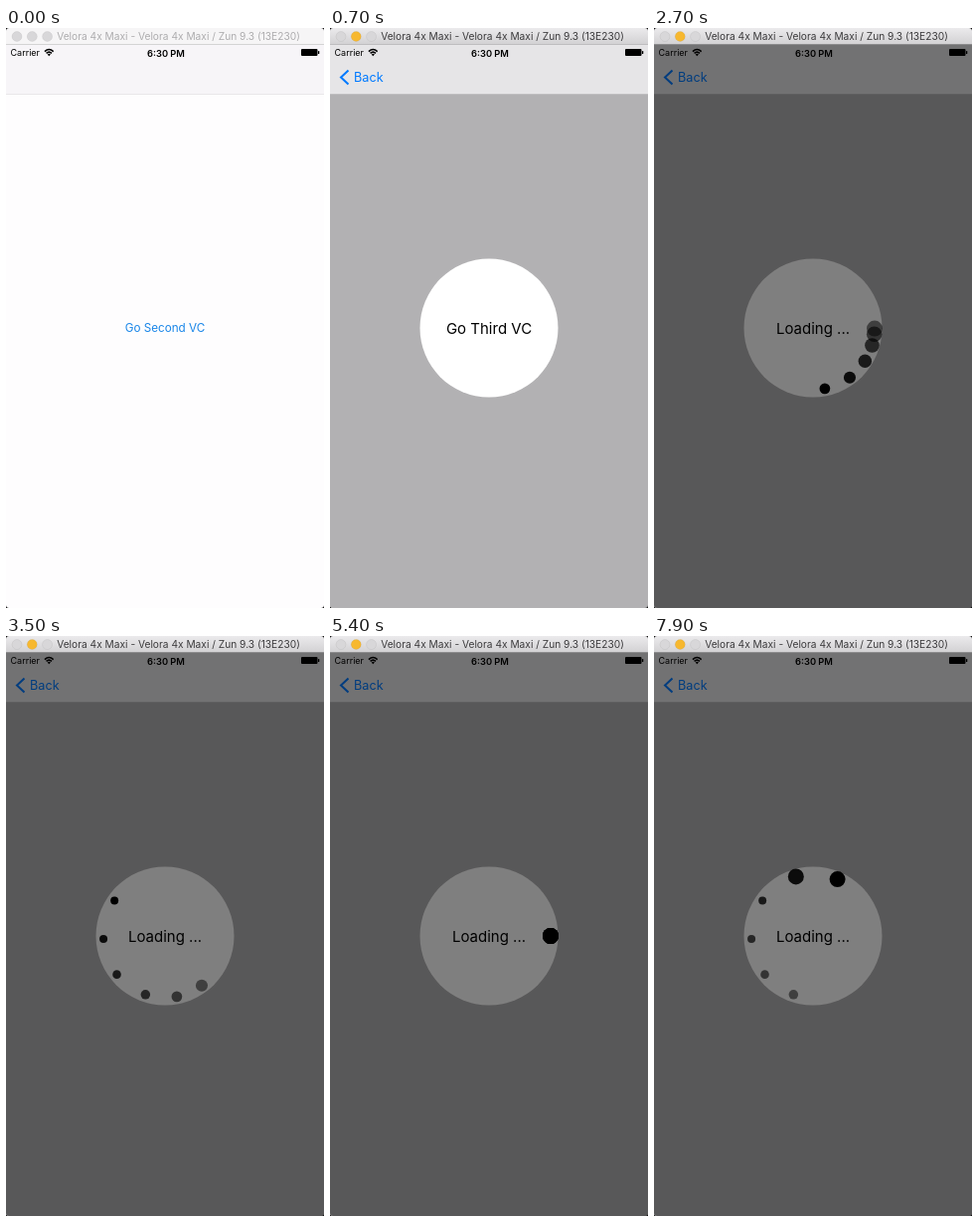
An HTML page for the animation above (8 s loop, 320x582 px).

```html
<!DOCTYPE html>
<html lang="en">
<head>
<meta charset="utf-8">
<style>
html, body { margin: 0; width: 100%; height: 100%; overflow: hidden; background: #000; }
svg { display: block; width: 320px; height: 582px; font-family: Inter, Roboto, sans-serif; }
.mid { text-anchor: middle; }
</style>
</head>
<body>
<svg viewBox="0 0 320 582">
  <defs>
    <linearGradient id="chrome" x2="0" y2="1">
      <stop stop-color="#ebeaec"/><stop offset="1" stop-color="#d2d1d3"/>
    </linearGradient>
    <clipPath id="window"><rect width="320" height="582" rx="3"/></clipPath>
  </defs>
  <g clip-path="url(#window)">
    <g id="first">
      <rect y="16" width="320" height="566" fill="#fefdfe"/>
      <text class="mid" x="160" y="305" font-size="11.7" fill="#1a86e8">Go Second VC</text>
    </g>
    <g id="second">
      <rect y="16" width="320" height="566" fill="#b2b1b3"/>
      <circle cx="160" cy="301" r="69.5" fill="#fff"/>
      <text id="go" class="mid" x="160" y="306.5" font-size="15">Go Third VC</text>
    </g>
    <rect y="16" width="320" height="50.5" fill="#f5f4f6" fill-opacity=".78"/>
    <rect y="66" width="320" height=".6" fill-opacity=".12"/>
    <g id="back" fill="#007aff">
      <path d="M18.5 42.5 L11 49.5 L18.5 56.5" fill="none" stroke="#007aff" stroke-width="2"/>
      <text id="label" x="24" y="54" font-size="12.7">Back</text>
    </g>
    <text x="4.5" y="28.3" font-size="9">Carrier</text>
    <g fill="none" stroke="#000" stroke-width="1.5">
      <path d="M38.9 23.6 Q43.3 19.4 47.7 23.6"/>
      <path d="M40.6 25.4 Q43.3 22.8 46 25.4"/>
    </g>
    <path d="M41.7 26.5 Q43.3 25.2 44.9 26.5 L43.3 28.2 Z"/>
    <text class="mid" x="161" y="28.5" font-size="9.3" font-weight="600">6:30 PM</text>
    <rect x="297" y="21" width="16.5" height="7" rx="1"/>
    <rect x="314" y="23" width="1.3" height="3" rx=".6"/>
    <rect id="shade" y="16" width="320" height="566"/>
    <g id="loader">
      <g id="dots"></g>
      <text id="loading" class="mid" x="160" y="306.5" font-size="15">Loading ...</text>
    </g>
    <rect id="bar" width="320" height="16.5"/>
    <rect y="16" width="320" height=".7" fill-opacity=".2"/>
    <g id="lights" stroke="#000" stroke-opacity=".06" fill="#d8d7d9">
      <circle cx="11" cy="8.5" r="5"/>
      <circle id="amber" cx="26.3" cy="8.5" r="5"/>
      <circle cx="41.6" cy="8.5" r="5"/>
    </g>
    <text id="title" class="mid" x="173.5" y="12.4" font-size="10.2">Velora 4x Maxi - Velora 4x Maxi / Zun 9.3 (13E230)</text>
  </g>
</svg>
<script>
const LOOP = 8000, LAP = 4000, START = 1616, DELAY = 200, COUNT = 6;
const $ = id => document.getElementById(id);
const set = (el, attrs) => Object.entries(attrs).forEach(([k, v]) => el.setAttribute(k, v));
const ramp = (t, from, to) => Math.min(1, Math.max(0, (t - from) / (to - from)));

const dots = Array.from({ length: COUNT }, (_, i) => {
  const dot = document.createElementNS('http://www.w3.org/2000/svg', 'circle');
  set(dot, { opacity: 1 - i * 0.1 });
  return $('dots').appendChild(dot);
});

// Steps are counted in units of the delay between two dots.
function placeDot(dot, elapsed) {
  const n = elapsed < 0 ? 0 : (elapsed % LAP) / DELAY;
  const degrees = Math.min(360, 276.6 * (1 - Math.cos(Math.PI * n / 22)));
  const a = n > 13.2 ? 0 : degrees * Math.PI / 180;
  const shrink = n < 10 ? (1 - Math.cos(Math.PI * Math.min(1, n / 9))) / 2 : 0;
  set(dot, { cx: 160 + 62 * Math.cos(a), cy: 301 + 62 * Math.sin(a), r: 8 - 4 * shrink });
}

function draw(t) {
  const active = t >= 100;
  set($('bar'), { fill: active ? 'url(#chrome)' : '#f6f5f6' });
  set($('amber'), { fill: active ? '#f7b82f' : '#d8d7d9' });
  set($('title'), { fill: active ? '#3c3b3d' : '#adacae' });

  const push = 1 - (1 - ramp(t, 180, 680)) ** 3;
  set($('first'), { transform: `translate(${-96 * push})` });
  set($('second'), { transform: `translate(${320 * (1 - push)})` });
  set($('back'), { opacity: push });
  set($('label'), { x: 24 + 110 * (1 - push) });

  const dim = ramp(t, 1450, 1650);
  set($('shade'), { opacity: dim / 2 });
  set($('go'), { opacity: 1 - dim });
  set($('loader'), { opacity: dim });
  set($('loading'), { opacity: ramp(t, 1800, 2300) });
  dots.forEach((dot, i) => placeDot(dot, t - START - i * DELAY));
}

const origin = performance.now();
function tick() {
  draw((performance.now() - origin) % LOOP);
  requestAnimationFrame(tick);
}
draw(0);
requestAnimationFrame(tick);
</script>
</body>
</html>
```
